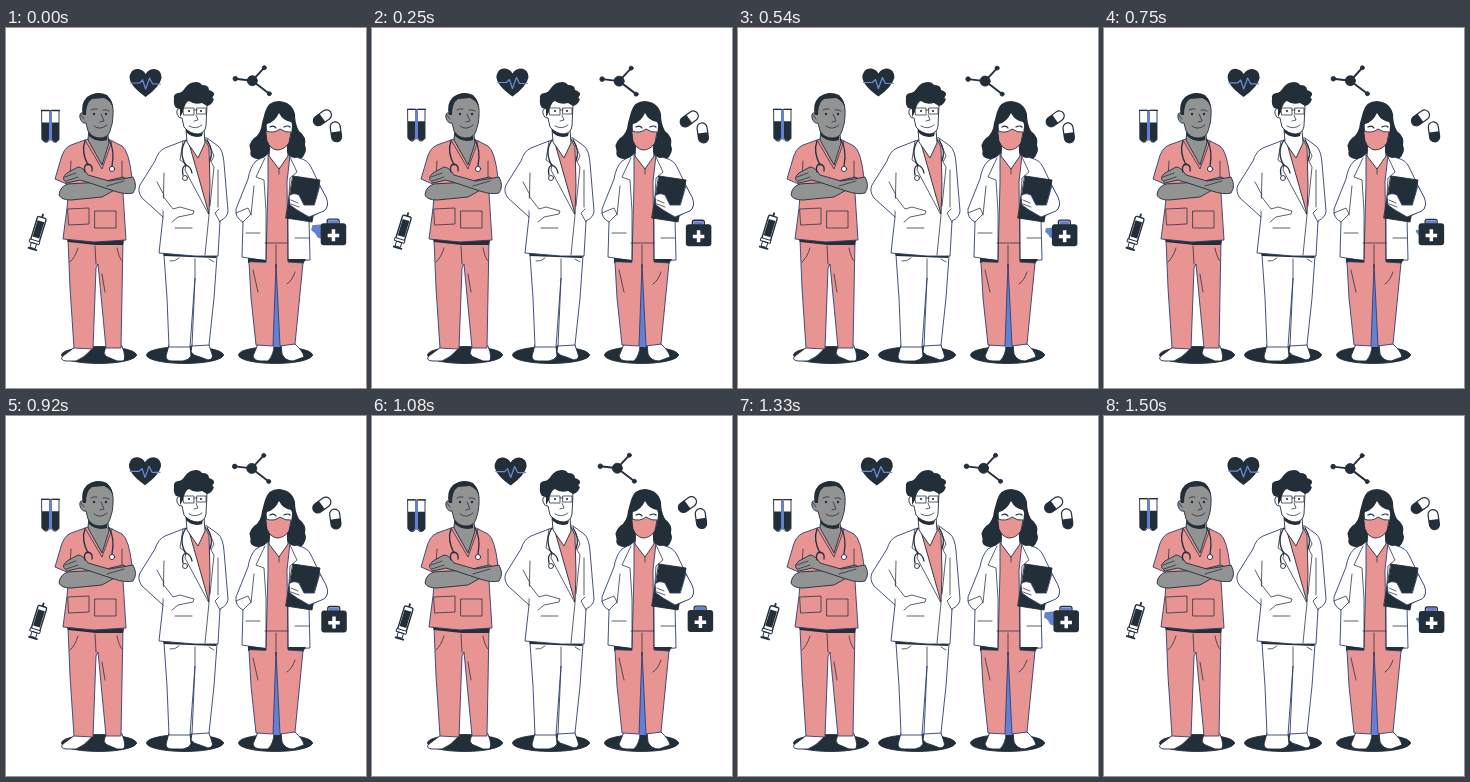
Recreate the animation shown at these times as an HTML page. Size 360x360 px, loop 1540 ms.

```html
<!DOCTYPE html>
<html lang="en">
<head>
<meta charset="utf-8">
<title>Medical team</title>
<style>
html, body { margin: 0; width: 100%; height: 100%; overflow: hidden; background: #fff }
svg { display: block; width: 100vw; height: 100vh }
path, ellipse, circle, rect { stroke: #232e3e; stroke-width: .9; stroke-linejoin: round; stroke-linecap: round }
.r { fill: #e79493 }
.d { fill: #222e38 }
.w { fill: #fefefe }
.g { fill: #929393 }
.b { fill: #6380d2; stroke: none }
.l { fill: none; stroke-width: .75 }
.e { stroke: #2f3f70 }
.n { stroke: none }
.s { fill: none; stroke-width: 1.3 }
.bold { stroke-width: 1.9 }
.pulse { fill: none; stroke: #6f8de0; stroke-width: 1.2 }
</style>
</head>
<body>
<svg viewBox="0 0 360 360">
  <defs>
    <g id="pill">
      <rect class="w" x="-5" y="-10" width="10" height="20" rx="5" style="stroke-width:1.2"/>
      <path class="d n" d="M-5 0H5V5A5 5 0 0 1-5 5Z"/>
    </g>
  </defs>

  <g id="shadows">
    <ellipse class="d" cx="93" cy="327" rx="37.500" ry="8.5"/>
    <ellipse class="d" cx="179" cy="327" rx="38.500" ry="8.5"/>
    <ellipse class="d" cx="269.500" cy="327" rx="37" ry="8.5"/>
  </g>

  <g id="nurse">
    <path class="w" d="M69 319L57 328Q53 332 60 333H70Q78 330 86 321V318Z"/>
    <path class="w" d="M100 318L98 325Q99 329 104 330L111 333H117Q121 331 116 318Z"/>
    <path class="r e" d="M62 211L64 260 68 320 87 321 90 240 92 236 100 320 115 320 117 212Z"/>
    <path class="l" d="M90 236L89 218M72 220Q69 230 64 234M111 220Q113 230 116 233M96 246L99 264"/>
    <path class="d n" d="M60 210L118 212 117 217 90 217 62 214Z"/>
    <path class="r e" d="M82 111L65 117Q57 120 54 134L49 151 63 157 61 180 57 211 88 214 120 212 117 165 116 152 126 150Q123 123 116 118L102 111Z"/>
    <path class="g" d="M83 100L82 112 96 137 103 115 101 99Z"/>
    <path class="d n" d="M83 104Q92 112 101 108V112Q91 115 83 108Z"/>
    <path class="g" d="M77 85Q73 84 74 90 76 96 80 95L82 103Q86 110 94 110 102 110 104 103 107 95 107 88 108 76 103 70 97 65 90 66 79 67 77 85Z"/>
    <path class="d n" d="M77 87Q74 76 81 69 91 62 101 67 106 72 107 80 104 72 98 70L86 71Q80 75 80 87Z"/>
    <path class="l" d="M85 82q3-2 6-1M97 82q3-1 6 1M95 86l3 7-4 1M88 98q6 5 13-1M75 87l3 4"/>
    <circle class="d n" cx="88" cy="86" r="1.2"/><circle class="d n" cx="100" cy="86" r="1.2"/>
    <path class="l" d="M79 112L96 141 106 113M65 133L64 150M116 133L116 151"/>
    <path class="g" d="M62 156Q54 158 53 167 55 172 65 172L96 169 119 156 125 153 117 149 96 154Z"/>
    <path class="g" d="M59 153Q55 150 61 145L72 139Q77 139 82 147L103 153 116 151 127 149Q132 158 127 165 120 167 108 163L84 155 74 152 61 155Z"/>
    <path class="l" d="M59 149l11-4M60 153l12-4M101 158l17-5"/>
    <path class="l" d="M62 181L83 180 83 196 63 197ZM89 183H110V200H89Z"/>
    <path class="s" d="M79 113Q75 124 82 137M103 112Q109 122 106 138"/>
    <path class="s" d="M79 144q-2-7 3-8 5 1 4 7"/>
    <circle class="w" cx="106" cy="141" r="2.6"/>
  </g>

  <g id="doctor">
    <path class="w" d="M163 317L160 328Q160 333 166 333H177Q183 332 185 328L184 318Z"/>
    <path class="w" d="M186 317L185 324Q188 328 194 329L202 332Q208 331 206 326L203 317Z"/>
    <path class="w e" d="M158 227L161 270 163 319 184 319 189 250 186 318 203 317 208 270 211 228Z"/>
    <path class="l" d="M189 250L189 231M164 233q5 1 9-3M203 231l5 3"/>
    <path class="d n" d="M156 224L211 227 210 230 158 228Z"/>
    <path class="w e" d="M177 113L159 120Q152 123 149 133L134 157Q131 163 136 170L157 189 153 225 189 228 212 228 214 193Q222 189 222 183L218 135Q217 122 212 118L201 110Z"/>
    <path class="r" d="M182 112L190 140 203 186 204 157 203 119 199 111Z"/>
    <path class="w" d="M180 101L181 114 192 130 199 115 198 101Z"/>
    <path class="d n" d="M180 98Q188 106 197 104L196 108Q187 111 180 104Z"/>
    <path class="w" d="M175 81Q170 79 171 86 173 91 176 90L178 99Q184 106 192 106 199 105 200 98L201 77Q191 68 175 73Z"/>
    <path class="d n" d="M174 89L174 81 170 80Q167 76 168 71 167 66 172 65 176 65 179 60 183 54 190 54 194 54 196 57 203 57 203 62 209 64 208 67 205 70 208 71 206 77 201 78L196 75Q188 77 183 73 179 74 177 84Z"/>
    <path class="l" d="M177 80H188V87H178ZM191 80H200V86H191ZM188 82H191M190 87l2 5-4 1M183 98q7 4 13-1"/>
    <circle class="d n" cx="183" cy="83" r="1.1"/><circle class="d n" cx="195" cy="83" r="1.1"/>
    <path class="l" d="M177 113L174 132 180 136 179 142 203 187 199 227M201 111L208 128 205 134 208 139 204 178M158 145L157 189M151 154L158 167M212 142L212 179"/>
    <path class="w n" d="M157 170L166 181 172 179 187 181 186 186 170 190 164 192 154 178"/>
    <path class="l" d="M157 168L167 181 174 179 188 183 187 186 172 189 166 194M169 200H186M213 181l-4 4 5 9"/>
    <path class="s" d="M180 112Q172 124 180 138M201 112Q208 122 204 133"/>
    <path class="s" d="M177 147q-2-8 3-10 5 2 6 8"/>
    <circle class="w" cx="179" cy="150" r="2.5"/>
  </g>

  <g id="surgeon">
    <path class="w" d="M252 316L247 328Q248 333 255 333H262Q268 327 268 317Z"/>
    <path class="w" d="M275 316L276 326Q279 333 287 333L298 329Q297 323 289 316Z"/>
    <path class="b" d="M267 236H273L274 319H267Z"/>
    <path class="d n" d="M259 84Q262 73 273 73 286 74 289 86 289 96 293 103 301 109 299 117 302 124 295 131L278 130 252 131Q242 130 245 122 241 117 248 110 255 106 256 95Z"/>
    <path class="w e" d="M262 126L250 133Q244 139 242 151L230 181Q229 190 237 194L236 229 260 233 282 233 304 232 303 190 320 181Q323 175 318 166L305 139Q302 132 293 130L282 124Z"/>
    <path class="d n" d="M242 230L261 232 260 236 242 235ZM281 231H300L297 236 282 235Z"/>
    <path class="r e" d="M243 234L245 270 250 317 267 318 270 236 274 318 289 316 297 235 282 234 281 154 284 127 262 127 262 155 260 234Z"/>
    <path class="l" d="M259 215H282M270 240V217M247 242l5 22M289 244q-3 9-8 12M273 146V137"/>
    <path class="w" d="M264 115L263 128 273 141 282 128 281 115Z"/>
    <path class="w" d="M260 95Q260 85 273 84 285 83 287 94L285 112Q273 127 261 111Z"/>
    <path class="d n" d="M257 104Q258 84 272 80 287 81 289 103L285 94Q277 93 273 85 269 94 261 96Z"/>
    <path class="r" d="M260 103Q268 106 274 101 280 105 285 104L283 115Q278 122 271 122 264 121 261 113Z"/>
    <path class="l" style="stroke-width:1.2" d="M264 99q4-2 6 1M278 99q4-2 6 0"/>
    <path class="d n" d="M257 99Q259 112 263 117 264 126 257 130 247 132 245 124 242 117 250 111ZM287 98Q284 112 281 120 280 128 288 130 297 130 299 122 300 111 291 106Z"/>
    <path class="l" d="M259 130L250 149 258 152 260 183 260 231M284 129L291 144 284 150 282 185 282 232M248 158L245 187"/>
    <path class="l" d="M237 194L245 186 242 180 230 185M289 210H303M240 205H254"/>
    <path class="d" d="M287 148L314 152 306 194 280 190Z"/>
    <path class="w e" d="M314 158L320 169Q324 178 318 183L303 189 291 182 284 177 283 168Q287 164 293 167L298 177 308 177Z"/>
    <path class="l" d="M285 172l7 3M285 176l8 3"/>
  </g>

  <g id="heart">
    <path class="d n" d="M140 69Q123 57 124 48 126 40 133 41 138 42 140 46 143 41 149 41 156 42 156 50 154 59 140 69Z"/>
    <path class="pulse" d="M125 55H134L137 52 140 61 144 50 147 56H155"/>
  </g>
  <g id="molecule">
    <path class="s bold" d="M229 51L246 53 258 40M246 53L263 66"/>
    <circle class="d" cx="246" cy="53" r="5"/><circle class="d" cx="229" cy="51" r="2.3"/>
    <circle class="d" cx="258" cy="40" r="2"/><circle class="d" cx="263" cy="66" r="2"/>
  </g>
  <g id="tubes">
    <path class="w" d="M36 82H44V111Q40 117 36 111ZM45 82H53V111Q49 117 45 111Z"/>
    <path class="d n" d="M36 94H43V111Q40 116 36 111ZM46 94H53V111Q49 116 46 111Z"/>
    <path class="b" d="M43 83H46V112H43Z"/>
    <path class="s" d="M35.500 82H43M46 82H53.500"/>
  </g>
  <g id="syringe" >
    <g transform="rotate(17 32 202)">
      <path class="s bold" d="M32 184V187M28 220H36"/>
      <rect class="w" x="27.500" y="187" width="9" height="25" rx="1.500" style="stroke-width:1.4"/>
      <rect class="d n" x="28.500" y="191" width="7" height="17"/>
      <path class="w" d="M27 211H37V214H27ZM29.500 214H34.500V219H29.500Z"/>
    </g>
  </g>
  <g id="kit">
    <path class="b" id="glow" d="M316 196L306 197 305 202 309 205 311 209 316 211Z"/>
    <path class="b" d="M322 196V192H332V196Z"/>
    <path class="s" d="M321 196V193Q321 191 323 191H331Q333 191 333 193V196"/>
    <rect class="d n" x="314.500" y="195" width="25.500" height="22" rx="3"/>
    <path class="w n" d="M325.500 201H329V205.500H333V209H329V213H325.500V209H321.500V205.500H325.500Z"/>
  </g>
  <g id="pills">
    <use href="#pill" transform="translate(316.500 90) rotate(54)"/>
    <use href="#pill" transform="translate(330 104) rotate(-8)"/>
  </g>
</svg>
<script>
const LOOP = 1540;
const el = id => document.getElementById(id);

// Resting offset and sway of each floating icon: [x, y, dx, dy]
const icons = {
  heart: [-.4, 0, 1, -.6],
  molecule: [.3, -.3, 1, .5],
  tubes: [0, .5, 0, -1.4],
  syringe: [-.3, 1.8, -1, -1.6],
  kit: [.2, .2, -1, 1.2],
  pills: [-.1, -.2, 1, 1.3]
};

// Blue patch behind the kit: [start time, scale]
const glowSteps = [[0, 1], [120, 0], [460, .75], [660, .4], [900, 0], [1220, 1], [1430, .4]];

function draw(now) {
  const t = now % LOOP;
  const s = Math.sin(2 * Math.PI * t / LOOP);
  for (const [id, [x, y, dx, dy]] of Object.entries(icons))
    el(id).setAttribute('transform', `translate(${x + dx * s} ${y + dy * s})`);
  const size = glowSteps.filter(step => step[0] <= t).pop()[1];
  el('glow').setAttribute('transform', `translate(316 205) scale(${size}) translate(-316 -205)`);
  requestAnimationFrame(() => draw(performance.now()));
}
draw(0);
</script>
</body>
</html>
```
